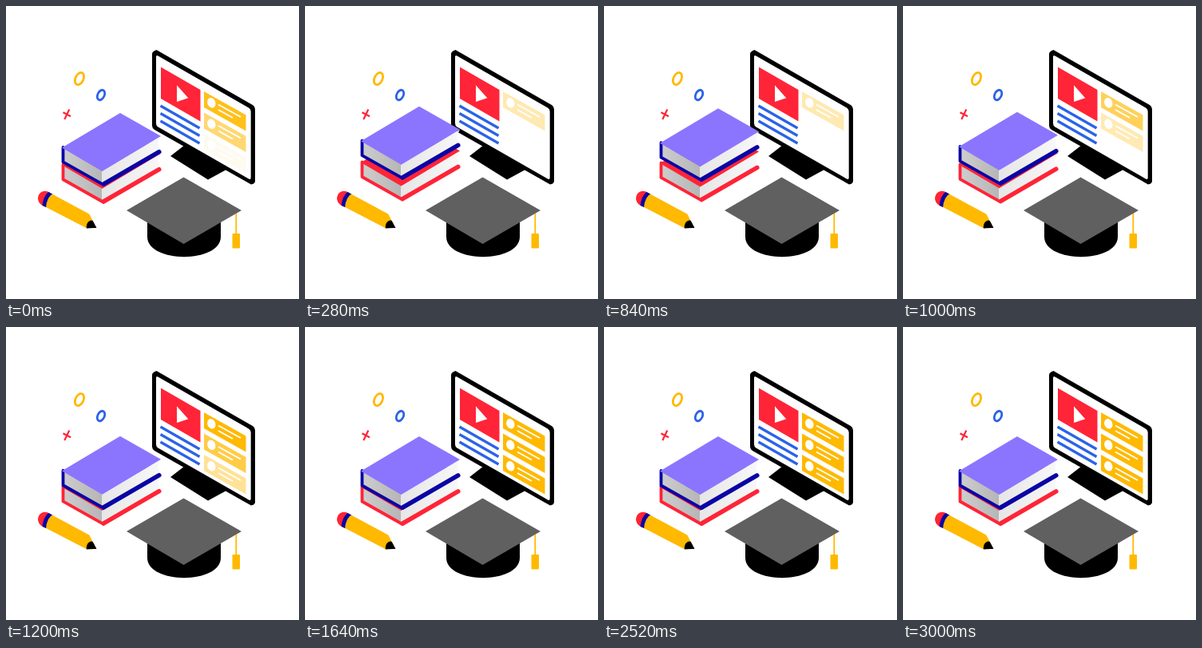
An HTML page that plays this animation: 367x367 px, repeating every 3.04 s.

```html
<!DOCTYPE html>
<html lang="en">
<head>
<meta charset="utf-8">
<title>Learning online</title>
<style>
html, body { margin: 0; width: 100%; height: 100%; overflow: hidden; background: #fff; }
svg { display: block; width: 100%; height: 100%; }
</style>
</head>
<body>
<svg viewBox="0 0 367 367">
  <defs>
    <linearGradient id="shade">
      <stop offset="0" stop-color="#cdcdcd"/>
      <stop offset="1" stop-color="#b6b6b6"/>
    </linearGradient>
    <linearGradient id="paper">
      <stop offset="0" stop-color="#e6e6e6"/>
      <stop offset="1" stop-color="#f8f8f8"/>
    </linearGradient>
    <!-- Pages and spine; the cover colour comes from "color" -->
    <g id="pages">
      <path d="M72 181L120 209V225L72 197Z" fill="url(#shade)"/>
      <path d="M120 209L194 166Q188 175 193 184L120 226Z" fill="url(#paper)"/>
      <g fill="none" stroke="currentColor" stroke-linecap="round" stroke-linejoin="round">
        <path d="M71.500 180V198.500L122 227" stroke-width="3.800"/>
        <path d="M122.500 226L191.800 185.800" stroke-width="5.500"/>
      </g>
    </g>
    <path id="cover" d="M143 137L194 166L120.500 210L70 180.500Z"/>
    <g id="card">
      <path d="M248 107L300.500 136.500V156.500L248 127Z" fill="#ffb900"/>
      <ellipse cx="257.300" cy="121.300" rx="5" ry="6.400" transform="rotate(-22 257.300 121.300)" fill="#fff"/>
      <path d="M266 123.500L294 139M266 130L284 140" stroke="#fff" stroke-width="2"/>
    </g>
    <clipPath id="barrel">
      <path id="body" d="M53 232.800L104.500 260.500L113.500 278L101 278.500L45 249.500Q40 246 40 240.500Q41 233 47 232Q50 231.500 53 232.800Z"/>
    </clipPath>
  </defs>

  <!-- Floating marks -->
  <g fill="none" stroke-width="2.800">
    <ellipse cx="92" cy="91" rx="5" ry="8" transform="rotate(25 92 91)" stroke="#ffb900"/>
    <ellipse cx="119" cy="111.500" rx="4.200" ry="6.600" transform="rotate(25 119 111.500)" stroke="#2b63e8"/>
    <path d="M71.500 133.200L81 138.200M79.300 129.500L73.300 142" stroke="#ff2437" stroke-width="2.200"/>
  </g>

  <!-- Monitor -->
  <path d="M206 188L224 174L275 203V205.500L253 217.500Z"/>
  <path d="M183 60Q183 57 188.500 55L309 124Q312 126 312 129V220Q311 223 307 223.500L186 155Q183 153 183 150Z"/>
  <path d="M188 64Q188 61 190.500 62.500L304 127.500Q306.700 129 306.700 132V215Q306.700 218 304 216.500L190.500 151.500Q188 150 188 147Z" fill="#fff"/>
  <path d="M194 76.500L243.500 105V144.500L194 116Z" fill="#ff2437"/>
  <path d="M214 99.300L228.300 115.300L214 120Z" fill="#fff"/>
  <path d="M193.500 125L242.500 153M193.500 134.500L242.500 162.500M193.500 144L242.500 172" stroke="#2b63e8" stroke-width="3.200"/>
  <use class="card" href="#card"/>
  <use class="card" href="#card" y="26.500"/>
  <use class="card" href="#card" y="53"/>

  <!-- Books -->
  <g id="lower" color="#ff2437">
    <use href="#pages" y="20"/>
    <use href="#cover" y="20" fill="#ff2437"/>
  </g>
  <g id="upper" color="#0a05a5">
    <use href="#pages"/>
    <use href="#cover" fill="#8b75ff"/>
  </g>

  <!-- Cap -->
  <path d="M177 262V289C177 322.500 269 322.500 269 289V262Z"/>
  <path d="M222.500 214.500L295 256L222.500 298L151 256Z" fill="#606060"/>
  <path d="M288.300 260V287" stroke="#ffb900" stroke-width="1.800"/>
  <rect x="283.500" y="285" width="9.500" height="18.500" rx="1" fill="#ffb900"/>

  <!-- Pencil -->
  <g clip-path="url(#barrel)">
    <use href="#body" fill="#ffb900"/>
    <path d="M38 230H59Q48 237 47.500 254H38Z" fill="#ff2437"/>
    <path d="M59 232Q48 237 47.500 254" fill="none" stroke="#0a05a5" stroke-width="4.800"/>
    <path d="M109 269L114 278L101 279Q100 274 103 270.500Q106 267.500 109 269Z"/>
  </g>
</svg>
<script>
const LOOP = 3040, STEP = 40, FADE = 467;
const cards = document.querySelectorAll('.card');
const upper = document.getElementById('upper');
const lower = document.getElementById('lower');
const goneAt = [420, 255, 25];
const backFrom = [700, 865, 1010];

const clamp = v => Math.min(1, Math.max(0, v));
const ease = v => (1 - Math.cos(Math.PI * clamp(v))) / 2;

function draw(now) {
  const t = Math.floor(now % LOOP / STEP) * STEP;
  const lift = ease((t + 200) / 600) - ease((t - 600) / 660);
  upper.setAttribute('transform', `translate(0 ${-12.5 * lift})`);
  lower.setAttribute('transform', `translate(0 ${-5 * lift})`);
  cards.forEach((card, i) => {
    card.style.opacity = clamp((t < 600 ? goneAt[i] - t : t - backFrom[i]) / FADE);
  });
}

const start = performance.now();
function tick() {
  draw(performance.now() - start);
  requestAnimationFrame(tick);
}
tick();
</script>
</body>
</html>
```
